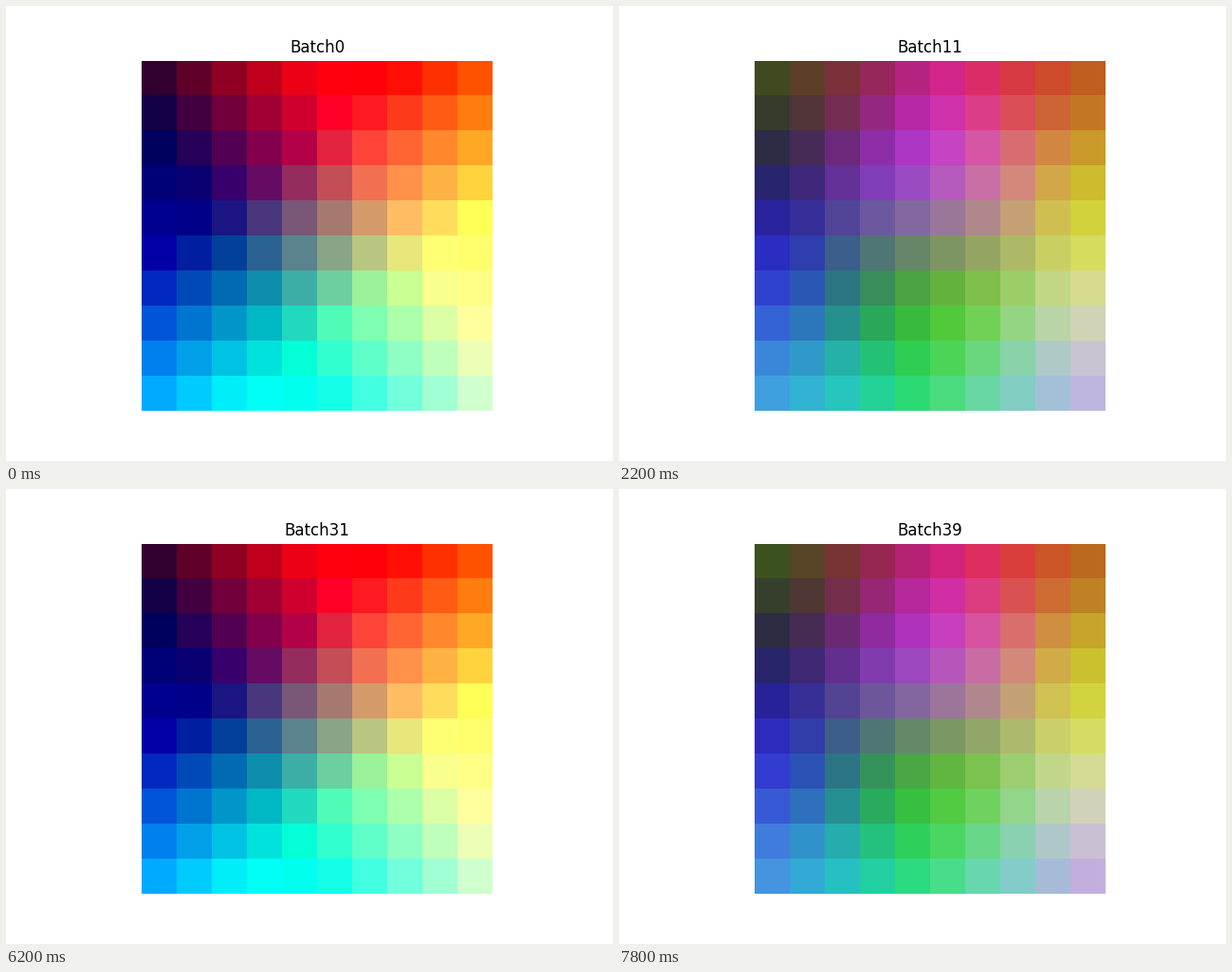
A matplotlib script that plays this animation: 640x480 px, repeating every 8000 ms.

```python
import numpy as np
import matplotlib.pyplot as plt
from matplotlib.animation import FuncAnimation

SIZE = 10       # cells per side of the map
RUN = 31        # batches per training run, then it starts again
FRAMES = 40
SIGMA = 1.0     # neighbourhood radius in cells
LEVELS = 24     # samples per colour channel

row, col = np.mgrid[:SIZE, :SIZE].reshape(2, -1, 1)


def initial_map():
    """Flat colour plane, clipped to the colour cube."""
    plane = (np.array([120, 88, 118])
             + (col - 4) * np.array([46.8, 33.4, -6.3])
             + (row - 4) * np.array([-29.2, 43.2, 24]))
    return np.clip(plane / 255, 0, 1)


def colour_cube():
    """Colours spread evenly over the whole RGB cube."""
    axis = (np.arange(LEVELS) + 0.5) / LEVELS
    return np.stack(np.meshgrid(axis, axis, axis), axis=-1).reshape(-1, 3)


def neighbourhood():
    """Gaussian influence of every cell on every other cell."""
    dist2 = (row - row.T) ** 2 + (col - col.T) ** 2
    return np.exp(-dist2 / (2 * SIGMA ** 2))


def train(cells, data, influence):
    """One batch step: each cell moves to the weighted mean of nearby wins."""
    dist2 = (cells ** 2).sum(axis=1) - 2 * data @ cells.T
    winner = dist2.argmin(axis=1)
    count = np.bincount(winner, minlength=len(cells))
    total = np.stack([np.bincount(winner, channel, minlength=len(cells))
                      for channel in data.T], axis=1)
    return influence @ total / (influence @ count)[:, None]


data, influence = colour_cube(), neighbourhood()
states = [initial_map()]
while len(states) < RUN:
    states.append(train(states[-1], data, influence))
states = [s.reshape(SIZE, SIZE, 3) for s in states]

fig, ax = plt.subplots(figsize=(6.4, 4.8), dpi=100)
ax.axis("off")
image = ax.imshow(states[0], interpolation="nearest")
title = ax.set_title("Batch0")


def update(i):
    image.set_data(states[i % RUN])
    title.set_text(f"Batch{i}")
    return image, title


anim = FuncAnimation(fig, update, frames=FRAMES, interval=200,
                     repeat=True, repeat_delay=0)
plt.show()
```
